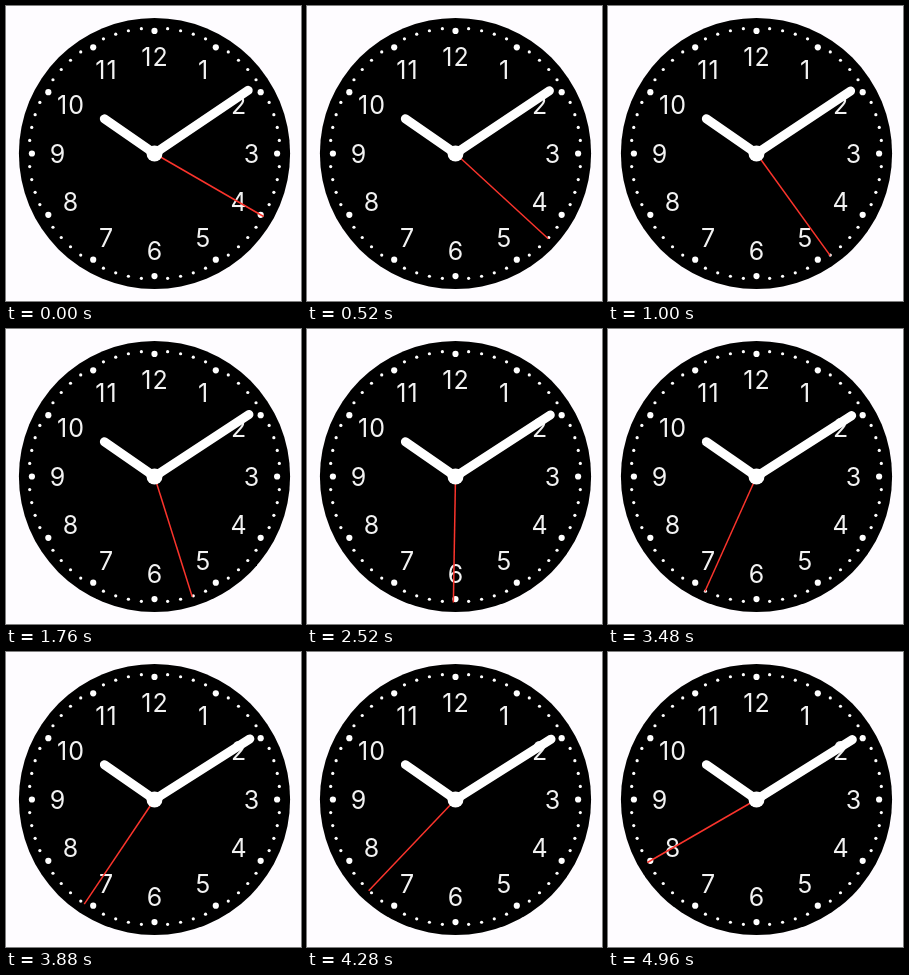
Write an HTML page that moves like this. It is 295x295 px and loops after 5000 ms.

```html
<!DOCTYPE html>
<html lang="en">
<head>
<meta charset="utf-8">
<title>Clock</title>
<style>
  html, body { margin: 0; width: 100%; height: 100%; overflow: hidden; background: #fefcff; }
  svg { display: block; width: 100%; height: 100%; }
  text { font: 25px Inter, "Liberation Sans", sans-serif; letter-spacing: 1px; text-anchor: middle; fill: #f2f2f2; }
  .hand { stroke: #fff; stroke-width: 9; stroke-linecap: round; }
</style>
</head>
<body>
<svg viewBox="0 0 295 295">
  <g transform="translate(148.5 147.5)">
    <circle r="135.6"/>
    <g id="dial" fill="#fff"></g>
    <path id="hour" class="hand" d="M0 0V-61"/>
    <path id="minute" class="hand" d="M0 0V-113"/>
    <path id="second" d="M0 0V-126" stroke="#fa342c" stroke-width="1.5"/>
    <circle r="8" fill="#fff"/>
  </g>
</svg>
<script>
const LOOP = 5000, STEP = 40;
const START = (10 * 60 + 9) * 60 + 20; // 10:09:20
const SPAN = 20;                       // clock seconds per loop

const byId = id => document.getElementById(id);

function add(tag, attrs, text = '') {
  const el = document.createElementNS('http://www.w3.org/2000/svg', tag);
  for (const key in attrs) el.setAttribute(key, attrs[key]);
  el.textContent = text;
  byId('dial').append(el);
}

function polar(minute, radius) {
  const a = minute * Math.PI / 30;
  return [radius * Math.sin(a), -radius * Math.cos(a)];
}

for (let m = 1; m <= 60; m++) {
  const onHour = m % 5 === 0;
  const [cx, cy] = polar(m, onHour ? 122.6 : 125.5);
  add('circle', { cx, cy, r: onHour ? 3.1 : 1.6 });
  if (onHour) {
    const [x, y] = polar(m, 97);
    add('text', { x: x + 0.5, y: y + 9 }, m / 5);
  }
}

function turn(id, degrees) {
  byId(id).setAttribute('transform', `rotate(${degrees})`);
}

function draw() {
  const step = Math.floor(performance.now() % LOOP / STEP);
  const time = START + SPAN * step / (LOOP / STEP - 1);
  turn('hour', time / 120);
  turn('minute', time / 10 % 360);
  turn('second', time * 6 % 360);
  requestAnimationFrame(draw);
}
draw();
</script>
</body>
</html>
```
